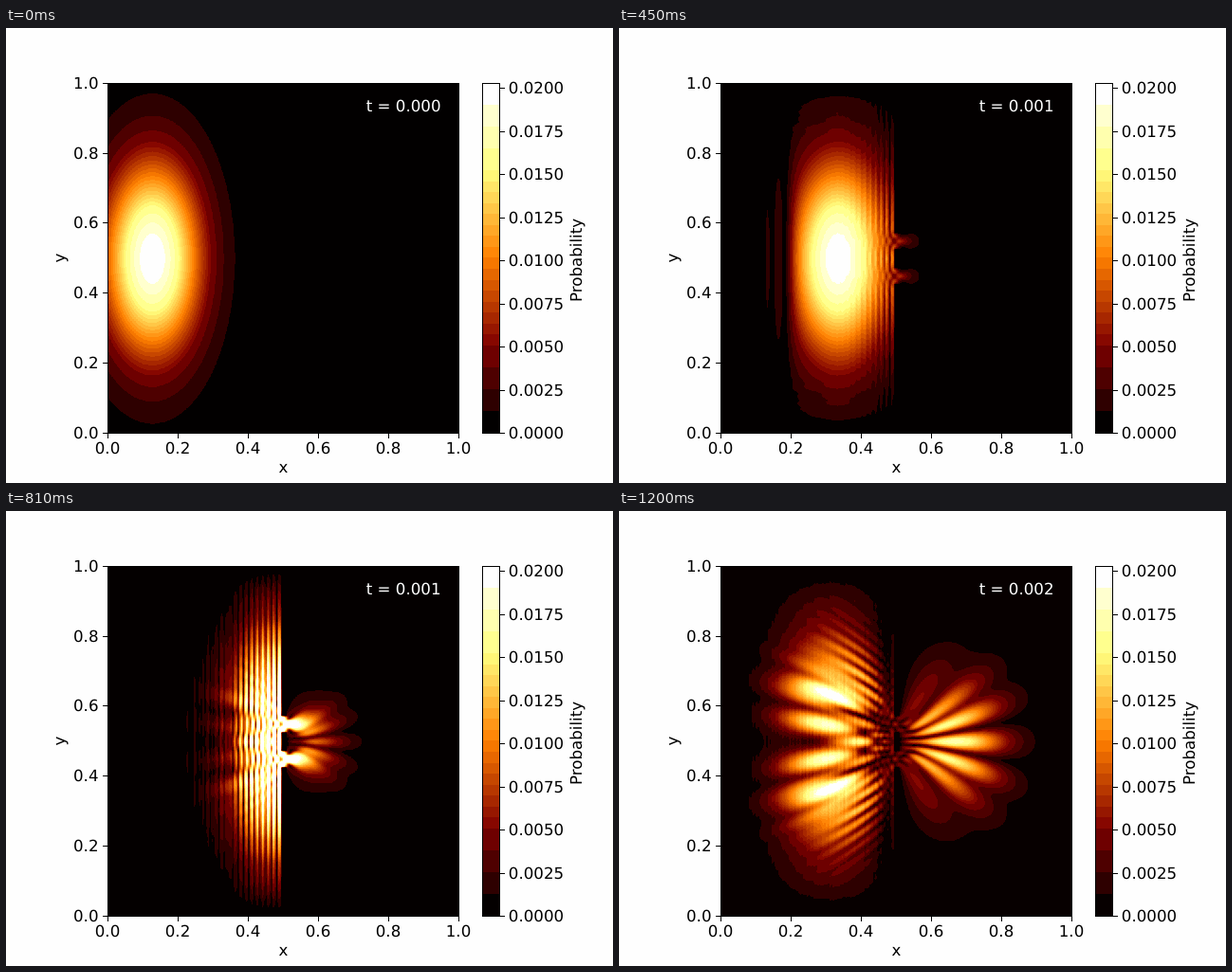
Write an HTML page with a canvas that moves like this. It is 640 px wide and 480 px high and loops after 1230 ms.

```html
<!DOCTYPE html>
<html lang="en">
<head>
<meta charset="utf-8">
<title>Double slit wave packet</title>
<style>
html, body { margin: 0; height: 100%; overflow: hidden; background: #fefefe; }
canvas { display: block; }
</style>
</head>
<body>
<canvas id="stage" width="640" height="480"></canvas>
<script>
const ctx = document.getElementById('stage').getContext('2d');
const N = 200, W = N + 2, H = 1 / N;          // grid with a border of zeros
const FRAMES = 41, FRAME_MS = 30, STEPS_PER_FRAME = 2, DT = 2.5e-5;
const LEFT = 107.2, TOP = 57.6, SIZE = 369.6, BOTTOM = TOP + SIZE;

// --- Wave packet: Crank-Nicolson steps, each solved by complex over-relaxation ---
const re = new Float64Array(W * W), im = new Float64Array(W * W);
const bRe = new Float64Array(W * W), bIm = new Float64Array(W * W);
const open = new Uint8Array(W * W);
const at = (i, j) => (j + 1) * W + i + 1;

function isWall(i, j) {
  const d = Math.abs(j - 100);
  return i >= 99 && i <= 101 && (d <= 5 || d >= 15);
}

function initWave() {
  let norm = 0;
  for (let j = 0; j < N; j++) for (let i = 0; i < N; i++) {
    if (isWall(i, j)) continue;
    const k = at(i, j), x = i * H, y = j * H;
    const a = Math.exp(-((x - 0.125) ** 2) / 0.02 - ((y - 0.5) ** 2) / 0.08);
    open[k] = 1;
    re[k] = a * Math.cos(200 * x);
    im[k] = a * Math.sin(200 * x);
    norm += a * a;
  }
  const scale = 1 / Math.sqrt(norm);
  for (let k = 0; k < W * W; k++) { re[k] *= scale; im[k] *= scale; }
}

function step() {
  const first = at(0, 0), last = at(N - 1, N - 1);
  for (let k = first; k <= last; k++) {
    if (!open[k]) continue;
    const sRe = re[k - 1] + re[k + 1] + re[k - W] + re[k + W];
    const sIm = im[k - 1] + im[k + 1] + im[k - W] + im[k + W];
    bRe[k] = re[k] + 2 * im[k] - sIm / 2;
    bIm[k] = im[k] - 2 * re[k] + sRe / 2;
  }
  const wRe = 1.0507, wIm = 0.2253;           // optimal relaxation factor
  for (let sweep = 0; sweep < 10; sweep++) {
    for (let k = first; k <= last; k++) {
      if (!open[k]) continue;
      const qRe = bRe[k] - (im[k - 1] + im[k + 1] + im[k - W] + im[k + W]) / 2;
      const qIm = bIm[k] + (re[k - 1] + re[k + 1] + re[k - W] + re[k + W]) / 2;
      const dRe = (qRe + 2 * qIm) / 5 - re[k];
      const dIm = (qIm - 2 * qRe) / 5 - im[k];
      re[k] += wRe * dRe - wIm * dIm;
      im[k] += wRe * dIm + wIm * dRe;
    }
  }
}

function amplitude() {
  const field = new Float32Array(N * N);
  for (let j = 0; j < N; j++) for (let i = 0; i < N; i++) {
    const k = at(i, j);
    field[j * N + i] = Math.sqrt(re[k] * re[k] + im[k] * im[k]);
  }
  return field;
}

initWave();
const fields = [amplitude()];
const peak = fields[0].reduce((a, b) => Math.max(a, b));
while (fields.length < FRAMES) {
  for (let s = 0; s < STEPS_PER_FRAME; s++) step();
  fields.push(amplitude());
}

// --- Banded heat colours: bands of 1/16, halved between 1/4 and 3/4 ---
const BANDS = 32, BAR_WEIGHT = 60;            // bar area per band, in grid cells
function bandOf(v) {
  const n = Math.min(BANDS - 1, Math.floor(v * BANDS));
  return n >= 8 && n < 24 ? n : n & ~1;
}

function heat(v) {
  return [2 * v, 2 * v - 0.5, 2 * v - 1].map(c => Math.floor(255 * Math.min(1, Math.max(0, c))));
}

// Each band takes the mean colour of what it covers.
function makePalette(field) {
  const sum = new Float64Array(BANDS), count = new Float64Array(BANDS);
  const add = (v, weight) => {
    const n = bandOf(v);
    sum[n] += v * weight;
    count[n] += weight;
  };
  for (let n = 0; n < BANDS; n++) add((n + 0.5) / BANDS, BAR_WEIGHT);
  for (const a of field) add(a / peak, 1);
  const colors = Array.from(sum, (s, n) => heat(s / count[n] || 0));
  colors[bandOf(1)] = [254, 254, 254];
  return colors;
}
const palettes = fields.map(makePalette);

// --- Heat map: raised-cosine blend between neighbouring cells ---
const PX = 370, MAP_X = 107, MAP_Y = 58;
const image = ctx.createImageData(PX, PX);

function sampler(offset) {
  return Array.from({ length: PX }, (_, p) => {
    const u = Math.min(N - 1, Math.max(0, (p + 0.5 + offset) / SIZE * N - 0.5));
    const cell = Math.min(N - 2, Math.floor(u));
    return { cell, mix: 0.5 - 0.5 * Math.cos(Math.PI * (u - cell)) };
  });
}
const cols = sampler(MAP_X - LEFT), rows = sampler(MAP_Y - TOP);

function drawMap(field, palette) {
  let out = 0;
  for (const { cell: j, mix: my } of rows) {
    for (const { cell: i, mix: mx } of cols) {
      const k = j * N + i;
      const a = field[k] + (field[k + 1] - field[k]) * mx;
      const b = field[k + N] + (field[k + N + 1] - field[k + N]) * mx;
      const c = palette[bandOf((a + (b - a) * my) / peak)];
      image.data[out++] = c[0];
      image.data[out++] = c[1];
      image.data[out++] = c[2];
      image.data[out++] = 255;
    }
  }
  ctx.putImageData(image, MAP_X, MAP_Y);
}

// --- Axes and colour bar ---
function text(str, x, y, align = 'center', color = '#000') {
  ctx.fillStyle = color;
  ctx.textAlign = align;
  ctx.fillText(str, x, y);
}

function sideText(str, x, y) {
  ctx.save();
  ctx.translate(x, y);
  ctx.rotate(-Math.PI / 2);
  text(str, 0, 0);
  ctx.restore();
}

function bar(x, y, w, h) {
  ctx.fillStyle = '#000';
  ctx.fillRect(x, y, w, h);
}

function drawAxes() {
  ctx.strokeStyle = '#000';
  ctx.strokeRect(107.5, 58.5, 370, 369);
  for (let n = 0; n <= 5; n++) {
    const label = (n / 5).toFixed(1);
    const x = Math.round(LEFT + SIZE * n / 5), y = Math.round(BOTTOM - SIZE * n / 5);
    bar(x, 428, 1, 5);
    bar(102, y, 5, 1);
    text(label, x, 449);
    text(label, 97.5, y + 6, 'right');
  }
  text('x', 292.5, 469);
  sideText('y', 62, 242.5);
}

function drawColorBar(palette) {
  for (let n = 0; n < BANDS; n++) {
    const y0 = Math.round(BOTTOM - SIZE * (n + 1) / BANDS), y1 = Math.round(BOTTOM - SIZE * n / BANDS);
    ctx.fillStyle = `rgb(${palette[bandOf(n / BANDS)]})`;
    ctx.fillRect(502, y0, 19, y1 - y0);
  }
  ctx.strokeRect(502.5, 58.5, 18, 369);
  for (let n = 0; n <= 8; n++) {
    const value = n * 0.0025, y = Math.round(BOTTOM - SIZE * value / peak);
    bar(521, y, 5, 1);
    text(value.toFixed(4), 529.8, y + 6, 'left');
  }
  sideText('Probability', 607, 245);
}

function draw(now) {
  const frame = Math.floor(now % (FRAMES * FRAME_MS) / FRAME_MS);
  ctx.fillStyle = '#fefefe';
  ctx.fillRect(0, 0, 640, 480);
  ctx.font = '16.67px "DejaVu Sans", sans-serif';
  ctx.textRendering = 'geometricPrecision';
  drawMap(fields[frame], palettes[frame]);
  drawAxes();
  drawColorBar(palettes[frame]);
  const time = frame * STEPS_PER_FRAME * DT;
  text('t = ' + time.toFixed(3), 458.5, 88, 'right', '#fefefe');
  requestAnimationFrame(draw);
}
requestAnimationFrame(draw);
</script>
</body>
</html>
```
